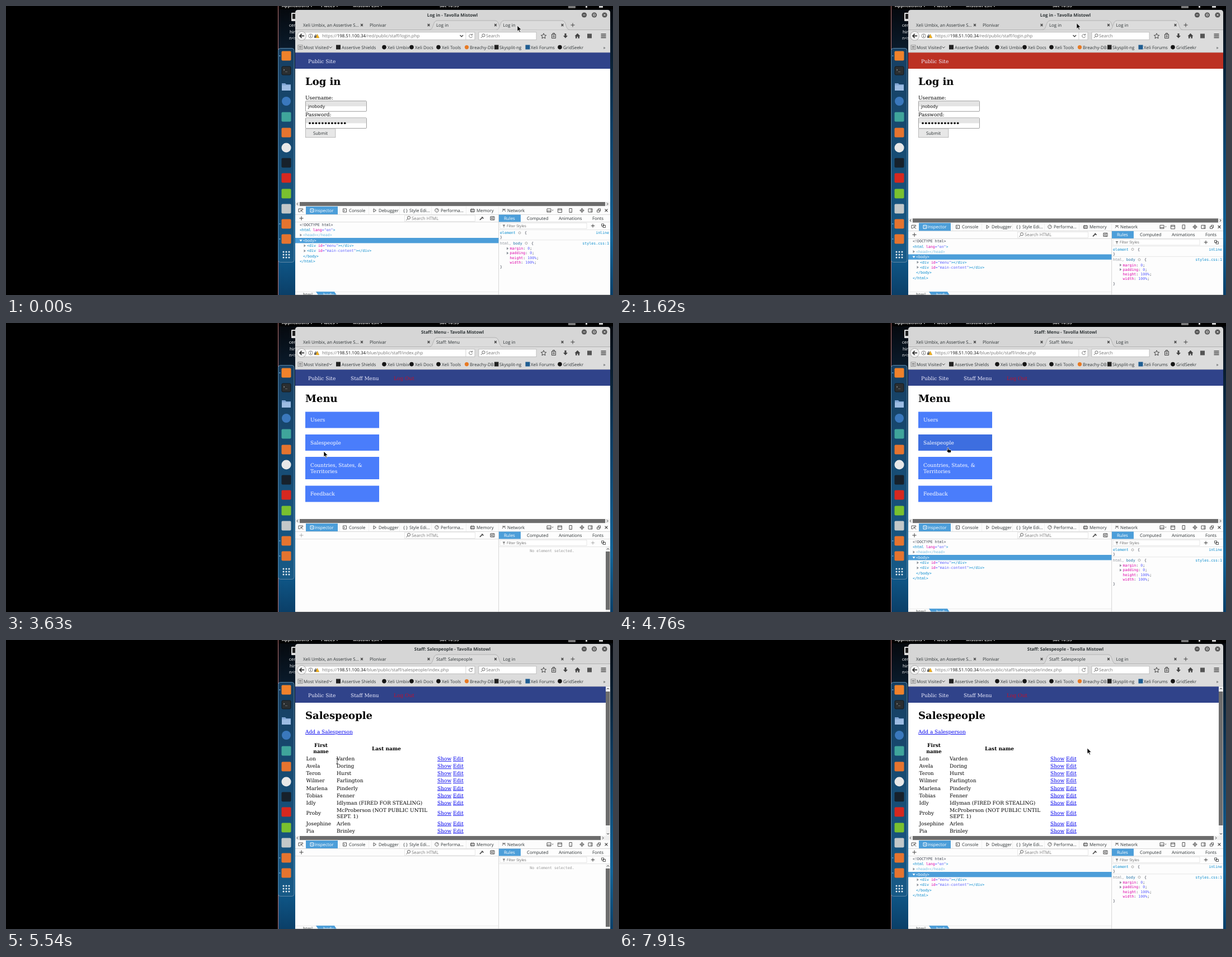
Animation of 1085 by 516 pixels, one loop 8 s. Source, as an HTML page:

```html
<!DOCTYPE html>
<html lang="en">
<head>
<meta charset="utf-8">
<title>Log in</title>
<style>
html, body { margin: 0; width: 100%; height: 100%; overflow: hidden; background: #000; }
svg { display: block; width: 100vw; height: 100vh; }
text { font: 7.85px "Open Sans", "Noto Sans", sans-serif; fill: #2e3436; white-space: pre; text-rendering: geometricPrecision; }
.serif { font: 9px "DejaVu Serif", serif; fill: #000; }
.mono { font: 6.6px "DejaVu Sans Mono", monospace; fill: #393f4c; }
.bold { font-weight: bold; }
.line { fill: none; stroke: #444; stroke-width: 1; }
</style>
</head>
<body>
<svg id="stage" viewBox="0 0 1085 516" preserveAspectRatio="none"></svg>
<script>
const LOOP = 8000;
const HOST = '198.51.100.34';
const BROWSER = 'Tavolla Mistowl';
const SELECT = '#4c9ed9';

// ---- markup helpers ----
const rect = (x, y, w, h, fill, more = '') => `<rect x="${x}" y="${y}" width="${w}" height="${h}" fill="${fill}" ${more}/>`;
const disc = (x, y, r, fill, more = '') => `<circle cx="${x}" cy="${y}" r="${r}" fill="${fill}" ${more}/>`;
const text = (x, y, s, cls = '', more = '') => `<text x="${x}" y="${y}" class="${cls}" ${more}>${s}</text>`;
const path = (d, more = '') => `<path class="line" d="${d}" ${more}/>`;
const solid = (d, fill, more = '') => `<path d="${d}" fill="${fill}" ${more}/>`;
const group = (id, body, more = '') => `<g id="${id}" ${more}>${body}</g>`;
const span = (fill, s) => `<tspan fill="${fill}">${s}</tspan>`;
const esc = s => s.replace(/</g, '&lt;').replace(/>/g, '&gt;');
const lens = (x, y) => path(`M${x + 1} ${y - 1}m-2.6 0a2.6 2.6 0 1 0 5.2 0a2.6 2.6 0 1 0 -5.2 0M${x - 1} ${y + 1}l-2.6 2.6`, 'style="stroke:#666"');
const cross = (x, y, r, w = 1.2) => path(`M${x - r} ${y - r}l${2 * r} ${2 * r}m0 ${-2 * r}l${-2 * r} ${2 * r}`, `style="stroke-width:${w}"`);
const plus = (x, y, r) => path(`M${x - r} ${y}h${2 * r}M${x} ${y - r}v${2 * r}`);
const middle = 'text-anchor="middle"';
const white = 'style="fill:#fff"';

// ---- desktop ----
function desktop() {
  let s = `<defs>
    <linearGradient id="wall" x2="0" y2="1"><stop stop-color="#05090e"/><stop offset=".13" stop-color="#0a1a2a"/>
      <stop offset=".4" stop-color="#0e3d63"/><stop offset=".8" stop-color="#11659b"/><stop offset="1" stop-color="#0b3f68"/></linearGradient>
    <linearGradient id="dockFill" x2="0" y2="1"><stop stop-color="#173f62"/><stop offset="1" stop-color="#175a87"/></linearGradient>
    <linearGradient id="field" x2="0" y2="1"><stop stop-color="#dedede"/><stop offset="1" stop-color="#f3f3f3"/></linearGradient>
    <clipPath id="view"><rect x="517" y="83" width="563" height="267"/></clipPath>
    <clipPath id="edge"><rect x="487" y="0" width="30" height="75"/></clipPath>
  </defs>`;
  s += rect(0, 0, 1085, 516, '#000') + rect(487, 6, 598, 510, 'url(#wall)') + rect(486, 0, 1, 516, '#b87474');
  const bar = (x, label) => text(x, 2.3, label, 'bold', 'style="fill:#ccc"');
  s += bar(493, 'Applications ▾') + bar(563, 'Places ▾') + bar(620, 'Mistowl ESR ▾') + bar(775, 'Sat 10:55');
  s += rect(1005, 0, 13, 4, '#777') + rect(1036, 0, 3, 3, '#ccc') + rect(1060, 0, 7, 3, '#ccc');
  s += `<g clip-path="url(#edge)">` + rect(510, 12, 14, 15, '#ddd', 'rx="1"') + rect(512, 14, 12, 9, '#222')
    + ['cert', 'hing', 'n&lt;s'].map((w, i) => text(506 + i % 2, 37 + i * 11.5, w, '', white)).join('') + '</g>';
  s += rect(486.5, 75.5, 28.5, 382, 'url(#dockFill)', 'rx="4" stroke="#5e87a6"');
  const square = (y, fill) => rect(492.5, y - 8.5, 17, 17, fill, 'rx="2"');
  s += square(89, '#f0822b');
  s += rect(493, 108, 16, 15, '#2b2f31', 'rx="2" stroke="#15181a"') + text(495, 116, '›_', 'mono', white);
  s += solid('M493 138h6l2 2h8v11h-16z', '#7fa5d4') + rect(493, 141.5, 16, 9.5, '#9cbce3');
  s += disc(501, 170, 8, '#3a78bd') + square(198, '#3fa59b') + square(226, '#e5742f') + disc(501, 253, 8.5, '#e8e8e8')
    + square(280, '#17212b') + square(307, '#d6281f') + square(335, '#79c12f') + square(362, '#c3c8c9')
    + square(389, '#e5742f') + square(416, '#e5742f');
  for (let i = 0; i < 9; i++) s += disc(496 + i % 3 * 5, 439 + Math.floor(i / 3) * 5, 1.5, '#e8eef2');
  return s + [89, 389, 416].map(y => disc(489.3, y, 1, '#6fb0e0')).join('');
}

// ---- browser chrome ----
const tabShape = (i, id, fill) => {
  const x = 518 + i * 119.5;
  return solid(`M${x} 42.5C${x + 8} 42.5 ${x + 5} 26 ${x + 14} 26H${x + 117}C${x + 126} 26 ${x + 123} 42.5 ${x + 131} 42.5`,
    fill, `id="${id}" stroke="#a9a9a9" stroke-width=".8"`);
};

function chrome() {
  let s = solid('M517 516V12q0-5 5-5h553q5 0 5 5v504z', '#d6d6d6');
  s += text(798, 18.7, '', 'bold', `id="title" ${middle}`);
  for (const x of [1033.5, 1051.5, 1070]) s += disc(x, 16, 4.6, '#575757');
  s += path('M1031.5 16h4M1049.8 14.3h3.4v3.4h-3.4zM1068.3 14.3l3.4 3.4m0-3.4l-3.4 3.4', 'style="stroke:#eee;stroke-width:.9"');
  s += rect(517, 42.5, 563, 40.5, '#dcdcdc') + rect(517, 42, 563, .8, '#a9a9a9');
  s += tabShape(2, 'hover2', '#dadada') + tabShape(3, 'hover3', '#dadada') + tabShape(2, 'tab2', '#dcdcdc') + tabShape(3, 'tab3', '#dcdcdc');
  s += text(531, 36.8, 'Xeli Umbix, an Assertive S...') + text(650, 36.8, 'Plonivar') + text(769, 36.8, '', '', 'id="tabName"') + text(888.5, 36.8, 'Log in');
  for (let i = 0; i < 4; i++) s += cross(636 + i * 119.5, 34, 1.9, 1.4);
  s += plus(1013, 34, 3.5);

  s += rect(532, 46.8, 306, 13.4, '#fff', 'stroke="#b4b4b4" stroke-width=".8"');
  s += group('forward', rect(532, 47, 19, 13, '#e6e6e6') + path('M540 53.4h8m-3-3l3 3l-3 3', 'style="stroke:#555;stroke-width:1.5"') + rect(551, 47, .8, 13, '#bbb'));
  s += disc(528.5, 53.4, 8, '#f3f3f3', 'stroke="#9b9b9b" stroke-width=".8"') + path('M533 53.4h-8m3.5-3.5l-3.5 3.5l3.5 3.5', 'style="stroke:#333;stroke-width:1.7"');
  s += group('address', disc(544.5, 53.4, 3.6, 'none', 'stroke="#666" stroke-width=".8"') + path('M544.5 52.8v2.6M544.5 51v.9')
    + solid('M551 57v-4h5v4zM552 53v-1q1.5-3 3 0v1h-.8q-.7-2.5-1.4 0z', '#666') + solid('M556.5 50l3.4 7h-6.2z', '#f2b01e', 'stroke="#8a6a18" stroke-width=".3"')
    + text(565, 56.2, '', '', 'id="url"'));
  s += path('M811.5 52l2.8 2.8l2.8-2.8', 'id="caret" style="stroke-width:1.4"');
  s += rect(821.5, 47, .8, 13, '#c8c8c8') + path('M833 51.5a3 3 0 1 0 .6 2.8M833.6 49.6v2.4h-2.5', 'style="stroke:#777"');
  s += rect(845, 46.8, 103, 13.4, '#fff', 'stroke="#b4b4b4" stroke-width=".8"') + lens(852.5, 53.4) + text(858, 56.2, 'Search', '', 'style="fill:#777"');
  s += path('M961 48.8l1.4 3.2l3.4.3l-2.6 2.2l.8 3.4l-3-1.8l-3 1.8l.8-3.4l-2.6-2.2l3.4-.3z');
  s += path('M975.5 50.5h7v7h-7zM977.5 50v-1.5h3v1.5M977 53h4M977 55h4');
  s += solid('M998.5 49h3v4h2.5l-4 4.5l-4-4.5h2.5z', '#444') + solid('M1021.5 48.7l5 5h-1.5v4h-2.5v-3h-2v3h-2.5v-4h-1.5z', '#444');
  s += rect(1039, 49.5, 8, 8, '#555') + path('M1063.5 50.3h9M1063.5 53.4h9M1063.5 56.5h9', 'style="stroke-width:1.6"');

  s += rect(522, 70, 8, 7.5, '#e8e8e8', 'stroke="#777" stroke-width=".8"') + path('M523.5 72.5h5M523.5 75h5') + path('M577.5 72.5l2.6 2.6l2.6-2.6');
  s += rect(590, 69.5, 8, 8, '#222');
  for (const x of [676, 725, 773]) s += disc(x, 73.6, 3.8, '#161616');
  s += disc(823.5, 73.6, 3.6, '#e77a24') + rect(873, 69.5, 7.5, 8, '#222') + rect(928.5, 69.5, 8, 8, '#1f5d92') + disc(990, 73.6, 3.8, '#161616');
  const marks = { 532: 'Most Visited', 600: 'Assertive Shields', 682: 'Xeli Umbix', 731: 'Xeli Docs', 779: 'Xeli Tools', 829: 'Breachy-DB', 882: 'Skysplit-ng', 938: 'Xeli Forums', 996: 'GridSeekr' };
  for (const x in marks) s += text(x, 76.6, marks[x]);
  return s + text(1067.5, 76.5, '»') + rect(517, 82.5, 563, .7, '#b5b5b5');
}

// ---- web pages ----
const head = s => text(535, 141, s, 'serif bold', 'style="font-size:18px"');
const navItem = (x, s, fill = '#eef') => text(x, 101.7, s, 'serif', `style="fill:${fill}"`);

function login() {
  const box = y => rect(535.4, y, 109, 18.6, '#fff', 'stroke="#8f8f8f" stroke-width=".9" rx="1"') + rect(536, y + .5, 108, 9, '#e4e4e4')
    + rect(536, y + .5, 108, 17.5, 'url(#field)', 'class="soft"');
  let s = head('Log in') + text(535, 167, 'Username:', 'serif') + text(535, 197, 'Password:', 'serif');
  s += box(169.6) + box(199.8) + text(540, 181.8, 'jnobody', '', 'style="fill:#000"');
  for (let i = 0; i < 12; i++) s += disc(543 + i * 5.7, 209.3, 1.8, '#000');
  s += rect(535.4, 219, 53.5, 15.6, '#e7e7e7', 'stroke="#adadad" stroke-width=".8"');
  s += group('pressed', rect(537, 220.6, 50.3, 12.4, '#f1f1f1', 'stroke="#c4c4c4" stroke-width=".7"'));
  return s + text(562, 229.6, 'Submit', '', middle);
}

function menu() {
  const item = (y, h, lines, id = '') => rect(535, y, 132, h, '#4a7dfb', `id="${id}"`)
    + lines.map((l, i) => text(544, y + 17.5 + i * 11, l, 'serif', white)).join('');
  return head('Menu') + item(158.5, 29, ['Users']) + item(199, 29, ['Salespeople'], 'pick')
    + item(239, 40, ['Countries, States, &amp;', 'Territories']) + item(290.5, 29, ['Feedback']);
}

function people() {
  const link = (x, y, s) => text(x, y, s, 'serif', 'style="fill:#00e" text-decoration="underline"');
  const th = (x, y, s) => text(x, y, s, 'serif bold', middle);
  const rows = ['Lon Varden', 'Avela Doring', 'Teron Hurst', 'Wilmer Farlington', 'Marlena Pinderly', 'Tobias Fenner',
    'Idly Idlyman (FIRED FOR STEALING)', 'Proby McProberson (NOT PUBLIC UNTIL', 'Josephine Arlen', 'Pia Brinley', 'Orla Tembry'];
  let s = head('Salespeople') + link(535, 167, 'Add a Salesperson') + th(563, 191, 'First') + th(563, 202, 'name') + th(680, 196.8, 'Last name');
  rows.forEach((row, i) => {
    const cut = row.indexOf(' '), y = 215.3 + i * 13.05 + (i > 7 ? 11 : i === 7 ? 5.3 : 0);
    s += text(536.5, y, row.slice(0, cut), 'serif') + text(591, i === 7 ? y - 5.3 : y, row.slice(cut + 1), 'serif');
    if (i === 7) s += text(591, y + 5.6, 'SEPT. 1)', 'serif');
    s += link(771, y, 'Show') + link(799, y, 'Edit');
  });
  s += rect(1072, 83, 8, 267, '#f0f0f0') + rect(1072, 92, 7.5, 239, '#6d6d6d');
  return s + path('M1074 88l2-2l2 2M1074 345l2 2l2-2', 'style="stroke:#333"');
}

// ---- developer tools ----
const BLUE = '#0088cc', PINK = '#dd00a9', VIOLET = '#5b5fff';
const arrow = (x, y, open) => solid(open ? `M${x - 2} ${y - 1.5}h5l-2.5 3.5z` : `M${x - 1} ${y - 2.5}l3.4 2.5l-3.4 2.5z`, open ? '#fff' : '#8a9199');
const tag = (s, name, value) => span(BLUE, esc('<' + s)) + (name ? ' ' + span(PINK, name) + span(VIOLET, `="${value}"`) : '') + span(BLUE, '&gt;');
const shut = s => span(BLUE, esc(`</${s}>`));

function tree() {
  const rows = [[525, esc('<!DOCTYPE html>')], [525, tag('html', 'lang', 'en')], [531, tag('head') + shut('head')], [531, span('#fff', esc('<body>'))],
    [538, tag('div', 'id', 'menu') + shut('div')], [538, tag('div', 'id', 'main-content') + shut('div')], [531, shut('body')], [525, shut('html')]];
  return rect(517, 414, 363.5, 9.4, SELECT) + rows.map(([x, s], i) => text(x, 392.8 + i * 9.33, s, 'mono', i === 2 ? 'opacity=".55"' : '')).join('')
    + arrow(526.5, 409, 0) + arrow(526.5, 418.7, 1) + arrow(533.5, 428, 0) + arrow(533.5, 437.2, 0);
}

function rules() {
  const row = (x, y, s, more = '') => text(x, y, s, 'mono', more);
  let s = row(883, 407.3, span(BLUE, 'element')) + disc(918, 405, 2, 'none', 'stroke="#aaa"') + row(927, 407.3, '{') + row(883, 415.3, '}');
  s += rect(881, 417.5, 199, .7, '#ddd') + row(883, 425.8, span('#8a9199', 'html, ') + span('#1d6fa5', 'body')) + disc(930, 423.5, 2, 'none', 'stroke="#aaa"') + row(939, 425.8, '{');
  s += row(1078, 407.3, 'inline', `text-anchor="end" style="fill:${BLUE}"`) + row(1078, 425.8, 'styles.css:1', `text-anchor="end" style="fill:${BLUE}"`);
  [['margin', '0'], ['padding', '0'], ['height', '100%'], ['width', '100%']].forEach(([k, v], i) => {
    s += row(900.5, 435.3 + i * 8.15, span(PINK, k) + ': ' + span(VIOLET, v) + ';');
  });
  return s + arrow(896, 433, 0) + arrow(896, 441.2, 0) + row(883, 468.2, '}');
}

function tools() {
  let s = rect(517, 349.6, 563, 200, '#fdfdfd') + rect(517, 349.6, 563, 8, '#efefef') + rect(525, 350, 546, 7.2, '#6d6d6d', 'id="hbar"');
  s += path('M522 351.5l-2 2l2 2', 'style="stroke:#333"') + path('M1074 351.5l2 2l-2 2', 'id="hend" style="stroke:#333"');
  s += rect(517, 357.6, 563, 14.6, '#fcfcfc') + rect(517, 372, 563, .7, '#ccc') + rect(517, 385.5, 563, .7, '#ccc') + rect(536, 358, 57, 14, SELECT);
  s += path('M525.5 367.5h-2.5v-5.5h7.5v2M527 364.5l4 4m-4-4v3m0-3h3', 'style="stroke-width:.9"') + path('M544 362h5.5v6h-5.5zM546 364l2 2', 'style="stroke:#fff"');
  s += path('M602.5 362h6v6h-6zM604 364l1.5 1.2l-1.5 1.2M657 362l4.5 3l-4.5 3zM770 368a3.2 3.2 0 1 1 .1 0M770 365l1.5-2M830.5 363h7v4.5h-7zM832 361.5v7M835 361.5v7M887 367l3-4l3 4M887 363h6', 'style="stroke-width:.9"');
  s += text(710, 367.8, '{ }');
  const tabs = { 613: 'Console', 666: 'Debugger', 721: 'Style Edi...', 777: 'Performa...', 841: 'Memory', 896: 'Network' };
  for (const x in tabs) s += text(x, 368, tabs[x]);
  s += text(551, 368, 'Inspector', '', white);
  for (const x of [600, 652, 707, 764, 826, 884]) s += rect(x - 4, 358, .6, 14, '#e6e6e6');
  s += path('M967 362h7v6h-7zM967 366h7M976 364l1.2 1.2l1.2-1.2M986.5 362h7v6.5h-7zM986.5 364h7M1007 361.5h4.5v7h-4.5zM1009 366.7h.8M1029.5 367.8a2.8 2.8 0 1 1 .1 0M1029.5 361v8M1025.5 365h8M1041 362h7v6h-7zM1046 362v6M1056.5 364.5h4.5v3.5h-4.5zM1058.5 364.5v-2.5h4v4h-1.5', 'style="stroke-width:.9"');
  s += cross(1073, 365, 2.4);
  s += group('add', plus(528, 379, 3.6)) + rect(712.5, 374, 126, 10.4, '#fff', 'stroke="#ddd" stroke-width=".7"') + lens(719, 379) + text(725, 382, 'Search HTML', '', 'style="fill:#777"');
  s += path('M847 382l4-4M850.5 376.5l3 3', 'style="stroke-width:1.7"') + path('M866 376h7v6h-7zM870.5 376v6M867 377.5l2 1.5l-2 1.5');
  s += rect(880.3, 372, .8, 150, '#ccc') + rect(881, 372.5, 39, 13, SELECT) + text(890, 382, 'Rules', '', white);
  s += text(931, 382, 'Computed') + text(988, 382, 'Animations') + text(1048, 382, 'Fonts');
  s += rect(883, 387.5, 155, 10, '#fff', 'stroke="#ddd" stroke-width=".7"') + solid('M887.5 390.5h5l-2 2.5v2.5h-1v-2.5z', '#777')
    + text(895, 395, 'Filter Styles', '', 'style="font-size:6.6px;fill:#666"') + rect(881, 399, 199, .7, '#ddd');
  s += group('add2', plus(1049, 392.5, 3.2)) + path('M1064.5 389h4v4h-4zM1067 391.5h4.5v4h-4.5z', 'style="stroke-width:.9"');
  s += group('tree', tree()) + group('rules', rules());
  return s + group('noRules', text(976, 408.6, 'No element selected.', 'mono', `${middle} style="fill:#999"`) + rect(1072, 400, 8, 116, '#f0f0f0')
    + rect(1072, 408, 7.5, 104, '#6d6d6d') + path('M1074 404.5l2-2l2 2', 'style="stroke:#333"'));
}

const crumbs = rect(517, 510, 363, 6, '#fcfcfc') + rect(517, 509.8, 363, .6, '#ddd') + solid('M554 510h33l4 6h-33z', SELECT)
  + text(531, 518.3, 'html') + text(567, 518.3, 'body', '', white);

const cursors = group('arrow', solid('M0 0v10.2l2.3-2.1l1.7 3.8l1.6-.7l-1.7-3.7h3.3z', '#000', 'stroke="#fff" stroke-width=".7"'))
  + group('hand', solid('M-.8 .8q.9-1.3 1.8 0v3l4 .9q1 .3.8 1.5l-.8 3.2h-4.8l-3-3.8q.4-1.4 2 0z', '#000', 'stroke="#fff" stroke-width=".7"'))
  + group('beam', path('M-2 -4.5q2 0 2 1.2q0-1.2 2-1.2M0 -3.5v8M-2 5.5q2 0 2-1.2q0 1.2 2 1.2', 'style="stroke:#222;stroke-width:.9"'));

document.getElementById('stage').innerHTML = desktop() + chrome()
  + group('page', rect(517, 83, 563, 300, '#fff') + rect(517, 83.2, 563, 28.8, '#30438a', 'id="banner"') + navItem(540, 'Public Site')
    + group('staffNav', navItem(616, 'Staff Menu') + navItem(693, 'Log Out', '#c3102c'))
    + group('login', login()) + group('menu', menu()) + group('people', people(), 'clip-path="url(#view)"'))
  + group('tools', tools()) + group('crumbs', crumbs) + rect(517, 515.3, 563, .7, '#aaa') + group('cursor', cursors);

// ---- animation ----
const $ = id => document.getElementById(id);
const show = (id, on) => $(id).setAttribute('display', on ? 'inline' : 'none');
const set = (id, name, value) => $(id).setAttribute(name, value);

// The screen refreshes in bursts: first step, last step, count.
const bursts = [[150, 1190, 8], [1350, 1620, 3], [1920, 2770, 7], [3050, 3930, 7], [4210, 4210, 1], [4640, 5540, 8], [5690, 6640, 7], [6790, 7760, 8], [7910, 7910, 1]];
const steps = [0].concat(...bursts.map(([a, b, n]) => Array.from({ length: n }, (_, i) => n > 1 ? a + (b - a) * i / (n - 1) : a)));
const track = [[0, 914, 35], [600, 908, 42], [1190, 868, 52], [1620, 818, 30.5], [1920, 818, 30.5], [2770, 568, 229], [4500, 568, 229],
  [4768, 588, 222], [5100, 589, 221], [5400, 592, 216], [5700, 592, 216], [6640, 562, 224], [7150, 537, 229], [7760, 817, 195], [7910, 837, 193]];

function pointer(s) {
  const i = track.findIndex(k => k[0] > s);
  if (i < 0) return track[track.length - 1].slice(1);
  const [t0, x0, y0] = track[i - 1], [t1, x1, y1] = track[i];
  const u = (s - t0) / (t1 - t0), e = u * u * (3 - 2 * u);
  return [x0 + (x1 - x0) * e, y0 + (y1 - y0) * e];
}

function render(time) {
  const s = steps.filter(t => t <= time + 10).pop();
  const [x, y] = pointer(s);
  const page = s < 3340 ? 'login' : s < 5150 ? 'menu' : 'people';
  const red = s >= 150 && s < 2050;
  const onRed = s < 1920;
  const name = { login: 'Log in', menu: 'Staff: Menu', people: 'Staff: Salespeople' }[page];
  const file = { login: 'login.php', menu: 'index.php', people: 'salespeople/index.php' }[page];

  $('title').textContent = `${name} - ${BROWSER}`;
  $('tabName').textContent = name;
  $('url').innerHTML = span('#777', 'https://') + span('#111', HOST) + span('#777', `/${onRed ? 'red' : 'blue'}/public/staff/${file}`);
  show('tab2', !onRed);
  show('tab3', onRed);
  show('hover2', onRed && (s === 0 || (y < 43 && x < 884)));
  show('hover3', !onRed && y < 43 && x > 884);
  const forward = !onRed && page === 'login';
  show('forward', forward);
  set('address', 'transform', `translate(${forward ? 14.5 : 0} 0)`);
  show('caret', y < 83);

  for (const id of ['login', 'menu', 'people']) show(id, id === page);
  show('staffNav', page !== 'login');
  set('banner', 'fill', red ? '#bc3123' : '#30438a');
  const onSubmit = page === 'login' && y > 218 && x < 589;
  show('pressed', onSubmit);
  document.querySelectorAll('.soft').forEach(e => e.setAttribute('display', !red && !onRed ? 'inline' : 'none'));
  const onPick = page === 'menu' && y < 228;
  set('pick', 'fill', onPick ? '#3d6ee0' : '#4a7dfb');

  const people = page === 'people';
  set('hbar', 'width', people ? 538 : 546);
  set('hend', 'transform', `translate(${people ? -8 : 0} 0)`);
  set('tools', 'transform', `translate(0 ${red ? 29.4 : 0})`);
  const hasTree = page === 'login' || (page === 'menu' ? s >= 4200 : s >= 6000);
  const hasRules = page === 'login' || (page === 'menu' ? s >= 3900 : s >= 5840);
  const ready = page === 'login' || (page === 'menu' ? s >= 3900 : s >= 5400);
  show('tree', hasTree);
  show('rules', hasRules);
  show('noRules', !hasRules);
  show('crumbs', ready);
  for (const id of ['add', 'add2']) set(id, 'opacity', ready ? 1 : .4);

  const beam = people && y > 206 && (x < 556 || (x > 590 && x < 632));
  show('hand', onPick);
  show('beam', beam);
  show('arrow', !onPick && !beam);
  set('cursor', 'transform', `translate(${x.toFixed(1)} ${y.toFixed(1)})`);
}

const start = performance.now();
function tick() {
  render((performance.now() - start) % LOOP);
  requestAnimationFrame(tick);
}
tick();
</script>
</body>
</html>
```
